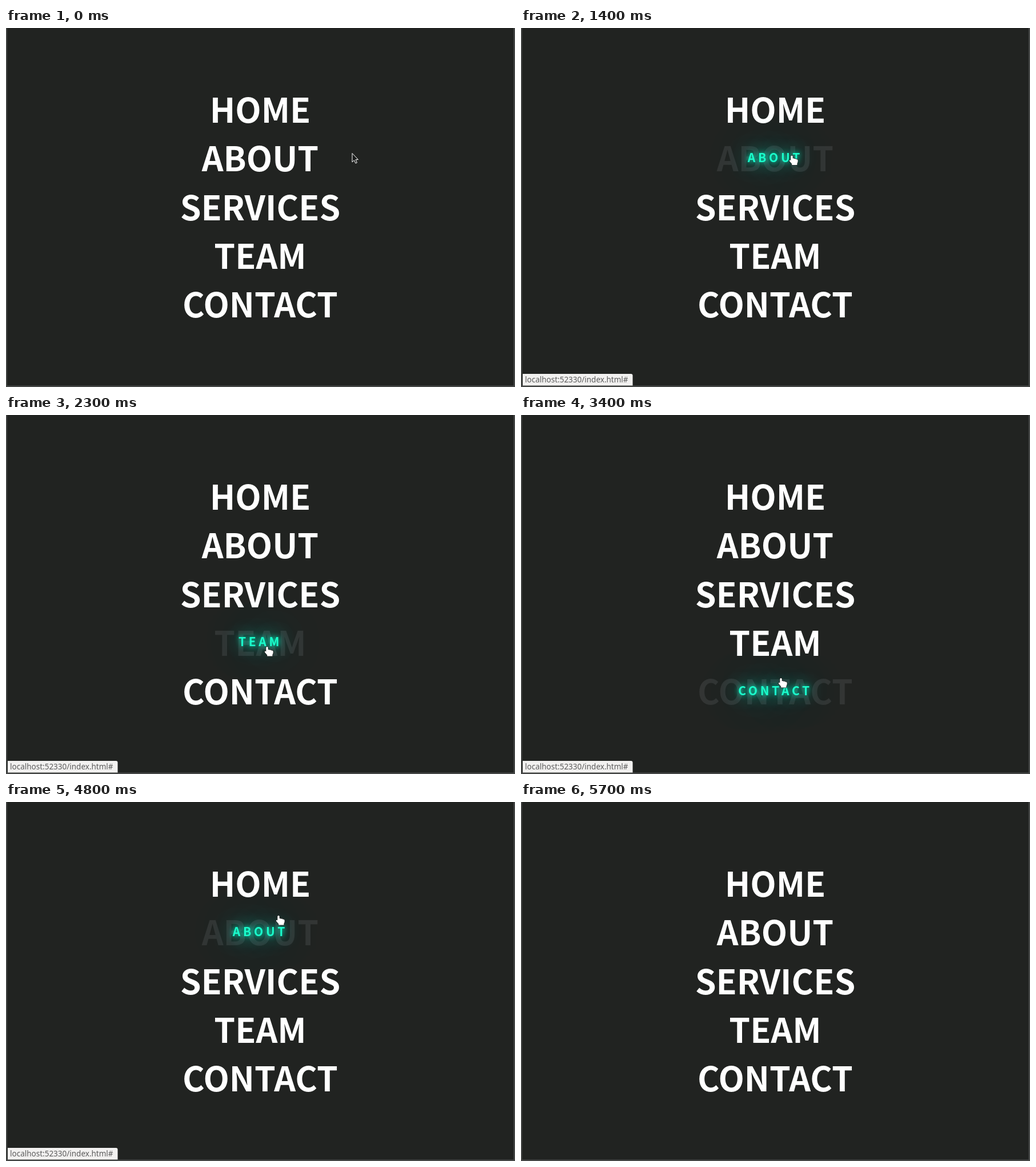
An HTML page with a canvas that plays this animation: 891x629 px, repeating every 6.1 s.

```html
<!DOCTYPE html>
<html lang="en">
<meta charset="utf-8">
<title>Menu</title>
<style>
  html, body { margin: 0; height: 100%; overflow: hidden; background: #212321; }
  canvas { display: block; }
</style>
<canvas id="stage" width="891" height="629"></canvas>
<script>
const ctx = document.getElementById('stage').getContext('2d');
const LOOP = 6100, STEP = 100, LEAVE = 5200, FADE_END = 5700;
const FACE = '"Noto Sans CJK JP", "Noto Sans CJK SC", "Noto Sans CJK", sans-serif';
const ITEMS = ['HOME', 'ABOUT', 'SERVICES', 'TEAM', 'CONTACT'];
const MID = 445, ROW = 85.2, FIRST = 166.2;

// Pointer glides: start time, end time, x, y of the tip at the end
const START = [605.5, 219];
const MOVES = [
  [100, 600, 496, 114], [800, 1200, 474, 203], [1300, 1800, 474, 305],
  [2100, 2300, 457, 406], [2700, 2900, 470, 472], [3000, 3100, 455, 461],
  [3400, 3600, 458, 411], [3700, 4000, 483, 334], [4100, 4800, 477, 199],
  [4800, 5100, 479, 140]
];
const ARROW = new Path2D('M.5 .5V16L4 12.7L6.4 18L8.9 17L6.6 11.6H11Z');
const HAND = new Path2D('M-1.7 1.2Q0 -1.2 1.7 1.2V5.2Q3.4 4.4 4.6 5.8Q6.4 5 7.4 6.6Q10.8 6 10.7 9.4Q10.7 12 9.4 14V16.5H.2V14.5L-4 9.8Q-4.6 7.4 -2.6 7.8L-1.7 8.6Z');

const progress = (t, from, to) => Math.max(0, Math.min(1, (t - from) / (to - from)));

function pointerAt(t) {
  return MOVES.reduce(([x, y], [from, to, endX, endY]) => {
    const k = progress(t, from, to);
    return [x + (endX - x) * k, y + (endY - y) * k];
  }, START);
}

function setFont(size, weight, spacing, face = FACE) {
  ctx.font = `${weight} ${size}px ${face}`;
  ctx.letterSpacing = spacing + 'px';
}

// Only the shadow lands on the stage; the word itself is drawn off to the left
function drawGlow(word, y) {
  ctx.save();
  ctx.shadowOffsetX = 2000;
  ctx.shadowColor = '#00ffcc';
  for (const blur of [80, 30, 10]) {
    ctx.shadowBlur = blur;
    ctx.fillText(word, MID - 2000, y);
  }
  ctx.restore();
}

function drawItem(word, i, active) {
  const y = FIRST + i * ROW;
  ctx.textAlign = 'center';
  setFont(59, 700, 0);
  ctx.fillStyle = active ? '#333534' : '#fff';
  ctx.fillText(word, MID, y);
  if (!active) return;
  setFont(21, 700, 4.7);
  ctx.fillStyle = '#1affcc';
  drawGlow(word, y - 16.5);
  ctx.fillText(word, MID, y - 16.5);
}

function drawStatus(alpha) {
  ctx.globalAlpha = alpha;
  ctx.fillStyle = '#f2f1f0';
  ctx.beginPath();
  ctx.roundRect(3, 606, 192.5, 20.5, [0, 3, 0, 0]);
  ctx.fill();
  ctx.fillStyle = '#5c5c5c';
  ctx.textAlign = 'left';
  setFont(13.5, 400, 0, '"Noto Sans", "Open Sans", sans-serif');
  ctx.fillText('localhost:52330/index.html#', 7, 620.5);
  ctx.globalAlpha = 1;
}

function drawPointer([x, y], hand) {
  const shape = hand ? HAND : ARROW;
  ctx.save();
  ctx.translate(x, y);
  ctx.lineWidth = hand ? 1.4 : 1;
  ctx.strokeStyle = hand ? '#1b1d1c' : '#fff';
  ctx.fillStyle = hand ? '#fff' : '#1b1d1c';
  if (hand) ctx.stroke(shape);
  ctx.fill(shape);
  if (!hand) ctx.stroke(shape);
  ctx.restore();
}

function draw(now) {
  const t = Math.floor(now % LOOP / STEP) * STEP;
  const tip = t < LEAVE ? pointerAt(t) : null;
  const active = tip && tip[0] < 535 ? Math.floor((tip[1] - 101) / ROW) : -1;

  ctx.fillStyle = '#454746';
  ctx.fillRect(0, 0, 891, 629);
  ctx.fillStyle = '#212321';
  ctx.fillRect(2, 0, 886.5, 626.5);

  ITEMS.forEach((word, i) => drawItem(word, i, i === active));
  if (t >= 400) drawStatus(progress(t, FADE_END, FADE_END - 300));
  if (tip) drawPointer(tip, active >= 0);
  requestAnimationFrame(draw);
}
requestAnimationFrame(draw);
</script>
</html>
```
